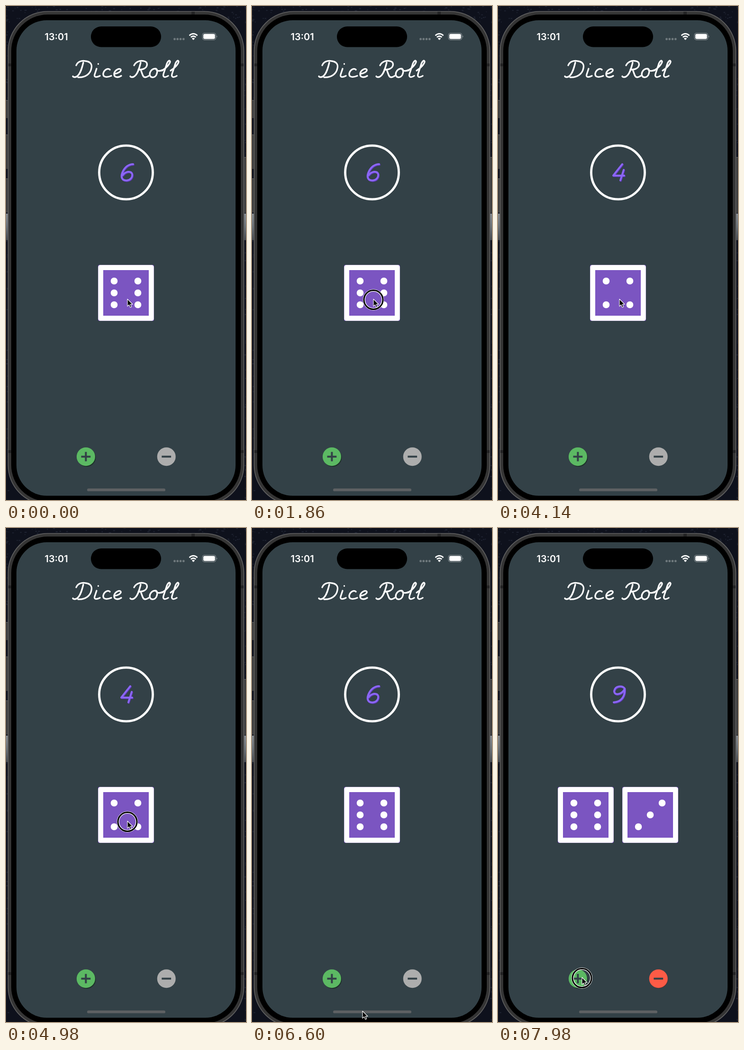
Write an HTML page that moves like this. It is 506 px wide and 1040 px high and loops after 8000 ms.

```html
<!DOCTYPE html>
<html lang="en">
<head>
<meta charset="utf-8">
<title>Dice Roll</title>
<style>
html, body { margin: 0; width: 100%; height: 100%; overflow: hidden; background: #0e111c; }
svg { display: block; width: 100%; height: 100%; }
.pen { fill: none; stroke-linecap: round; stroke-linejoin: round; }
</style>
</head>
<body>
<svg viewBox="0 0 506 1040" xmlns="http://www.w3.org/2000/svg">
  <defs>
    <g id="die">
      <rect x="-59" y="-59" width="118" height="118" rx="3" fill="#7047b8"/>
      <rect x="-58.7" y="-58.7" width="117.4" height="117.4" rx="4.5" fill="#fff"/>
      <rect x="-48" y="-48" width="96" height="96" fill="#7b55c1"/>
    </g>
    <linearGradient id="band" x2="0" y2="1">
      <stop stop-color="#858a90"/><stop offset=".5" stop-color="#697077"/><stop offset="1" stop-color="#41464d"/>
    </linearGradient>
  </defs>

  <rect width="506" height="1040" fill="#0e111c"/>
  <g id="specks"></g>
  <path d="M0 437H5V493H0ZM501 437H506V493H501Z" fill="url(#band)"/>
  <path d="M0 198H5V236H0ZM0 271H5V343H0ZM0 363H5V435H0ZM501 318H506V436H501Z" fill="#3b3b3c"/>
  <path d="M0 198.5H5M0 271H5M0 363.5H5M501 318.5H506" stroke="#626264"/>

  <rect x="4.5" y="11.5" width="497" height="1038" rx="83" fill="#353535" stroke="#626262" stroke-width="1.6"/>
  <path d="M391 12H398V18H391ZM5 121H11V127H5ZM495 121H501V127H495ZM5 935H11V941H5ZM495 935H501V941H495Z" fill="#232324"/>
  <rect x="11" y="18" width="484" height="1025" rx="77" fill="#000"/>
  <rect x="22" y="30" width="462" height="1001" rx="64" fill="#334147"/>
  <rect x="179" y="43" width="148" height="43.5" rx="21.7" fill="#000"/>

  <text x="81.5" y="71.6" font-family="Inter, sans-serif" font-size="20" font-weight="600" fill="#fff">13:01</text>
  <g fill="#707a7e">
    <circle cx="355.5" cy="69.7" r="2.4"/><circle cx="361.7" cy="69.7" r="2.4"/>
    <circle cx="368" cy="69.7" r="2.4"/><circle cx="374.3" cy="69.7" r="2.4"/>
  </g>
  <path d="M386.5 62.2Q395 54.6 403.5 62.2M389.7 65.8Q395 61.2 400.3 65.8" fill="none" stroke="#fff" stroke-width="2.7"/>
  <path d="M391.8 68.4Q395 65.8 398.2 68.4L395 71.8Z" fill="#fff"/>
  <rect x="414.2" y="57" width="28.2" height="14.4" rx="4.4" fill="none" stroke="#899195" stroke-width="1.2"/>
  <rect x="416" y="58.8" width="24.6" height="10.8" rx="3" fill="#fff"/>
  <path d="M444 62Q446.6 64.2 444 66.6Z" fill="#899195"/>

  <g class="pen" role="img" aria-label="Dice Roll" stroke="#fff" stroke-width="3.3">
    <path d="M163 119C160 131 157 142 151 147C147 151 142 150 141 148M148 125C151 117 160 114 168 116C178 117 182 123 180 131C178 143 167 151 152 150"/>
    <path d="M191 132L187 144C185 150 190 151 198 147M194.5 122V122.1"/>
    <path d="M219 134C215 130 207 134 205 142C204 150 212 151 222 147"/>
    <path d="M228 143C236 142 243 138 242 134C240 130 230 134 228 142C227 150 235 152 243 147"/>
    <path d="M284 119C281 131 278 142 272 147C268 151 263 150 262 148M270 125C274 117 283 114 291 116C300 118 299 128 291 132C287 134 282 134 279 134M284 134C287 141 288 150 293 150C297 150 299 148 301 147"/>
    <path d="M316 132C308 131 303 138 303 144C304 152 313 152 317 145C320 139 319 133 316 132C317 137 324 138 329 135"/>
    <path id="ell" d="M329 136C338 131 346 121 346 117C345 112 340 117 338 125L332 143C330 151 336 151 342 147"/>
    <use href="#ell" x="18"/>
  </g>

  <circle cx="253" cy="350.4" r="56.5" fill="none" stroke="#fff" stroke-width="4.8"/>
  <g class="pen" stroke-width="4">
    <path id="shade" stroke="#5636a8" transform="translate(1 1.2)"/>
    <path id="digit" stroke="#8b66f6"/>
  </g>

  <g id="die1"><use href="#die"/><path class="pen" stroke="#fff" stroke-width="14.6"/></g>
  <g id="die2"><use href="#die"/><path class="pen" stroke="#fff" stroke-width="14.6"/></g>

  <circle cx="170" cy="950.6" r="19.3" fill="#1d3229"/>
  <circle cx="168.4" cy="948.7" r="19.5" fill="#5cb963"/>
  <path d="M158.5 948.7H178.3M168.4 938.8V958.6" stroke="#334147" stroke-width="4"/>
  <circle id="minusShade" cx="339" cy="949.8" r="19.3" fill="#542f30"/>
  <circle id="minus" cx="338.2" cy="948.7" r="19.5"/>
  <path d="M328.3 948.7H348.1" stroke="#334147" stroke-width="4"/>
  <rect x="171" y="1015.8" width="165" height="5.8" rx="2.9" fill="#5e6163"/>

  <g id="ring" fill="none">
    <circle r="19.7" stroke="#fff" stroke-width="5"/>
    <circle r="20" stroke="#000" stroke-width="3"/>
  </g>
  <path id="cursor" d="M0 0V15.2L3.5 12L6 17.6L8.6 16.5L6.2 11H11Z" fill="#000" stroke="#fff" stroke-width="1.1" stroke-linejoin="round"/>
</svg>
<script>
const LOOP = 8000;
const $ = id => document.getElementById(id);

const digits = {
  2: 'M248 339C252 331 267 332 266 340C265 350 251 359 243 367H264',
  3: 'M247 337C252 332 267 331 267 339C267 346 258 348 253 348C262 348 267 352 265 358C262 367 247 369 242 363',
  4: 'M262 333L243 357H266M265 345L258 367',
  5: 'M268 333H252L248 347C258 344 267 349 264 358C261 367 249 369 243 364',
  6: 'M268 333C256 333 247 343 244 355C242 366 250 368 256 367C263 366 267 360 266 354C264 347 253 347 246 356',
  9: 'M267 338C262 331 247 332 245 343C244 353 260 352 267 339C268 352 262 366 244 367'
};

// Pips as [column, row] in steps of 25 px
const diagonal = [[1, -1], [-1, 1]];
const corners = [...diagonal, [-1, -1], [1, 1]];
const pips = {
  2: diagonal,
  3: [...diagonal, [0, 0]],
  4: corners,
  5: [...corners, [0, 0]],
  6: [...corners, [-1, 0], [1, 0]]
};

// press time, release time, face after the release
const taps = [
  [30, 480, 5], [930, 1380, 6], [1860, 2310, 5], [2790, 3240, 2], [3690, 4140, 4],
  [4590, 5040, 5], [5520, 5970, 3], [6150, 6390, 6], [7470, 7800, 6], [7950, 8400, 6]
];
const ADDED = 7800;

// time, x, y of the pointer tip
const route = [[6390, 256, 617], [6600, 233, 1017], [6870, 163, 957], [7110, 177, 946]];

function pointer(t) {
  if (t <= route[0][0]) return route[0].slice(1);
  const i = route.findIndex(p => p[0] > t);
  if (i < 0) return route[route.length - 1].slice(1);
  const [t0, x0, y0] = route[i - 1], [t1, x1, y1] = route[i];
  const k = (t - t0) / (t1 - t0), e = k * k * (3 - 2 * k);
  return [x0 + (x1 - x0) * e, y0 + (y1 - y0) * e];
}

function place(el, x, y) {
  el.setAttribute('transform', `translate(${x} ${y})`);
}

function show(el, on) {
  el.style.display = on ? '' : 'none';
}

function drawDie(el, x, face) {
  place(el, x, 604);
  el.lastChild.setAttribute('d', pips[face].map(([c, r]) => `M${c * 25} ${r * 25}h.01`).join(''));
}

function render(t) {
  const face = taps.reduce((f, [, up, next]) => t >= up ? next : f, 6);
  const two = t >= ADDED;
  drawDie($('die1'), two ? 185 : 253, face);
  drawDie($('die2'), 321, 3);
  show($('die2'), two);

  const shape = digits[two ? face + 3 : face];
  $('digit').setAttribute('d', shape);
  $('shade').setAttribute('d', shape);
  $('minus').setAttribute('fill', two ? '#fd5b46' : '#adadad');
  show($('minusShade'), two);

  const [x, y] = pointer(t);
  place($('cursor'), x, y);
  place($('ring'), x, y + 1.5);
  show($('ring'), taps.some(([down, up]) => t >= down && t < up));
}

// Faint wallpaper grain around the phone
let seed = 7;
const rand = () => (seed = seed * 16807 % 2147483647) / 2147483647;
let grain = '';
for (let i = 0; i < 260; i++) {
  const top = i < 160;
  const x = top ? rand() * 506 : rand() < .5 ? rand() * 4 : 502 + rand() * 4;
  const y = top ? rand() * 34 : rand() * 1040;
  grain += `M${x.toFixed(1)} ${y.toFixed(1)}h${(1 + rand() * 4).toFixed(1)}`;
}
$('specks').innerHTML = `<path d="${grain}" stroke="#1e2331" stroke-width="2"/>`;

const start = performance.now();
function tick() {
  render((performance.now() - start) % LOOP);
  requestAnimationFrame(tick);
}
tick();
</script>
</body>
</html>
```
